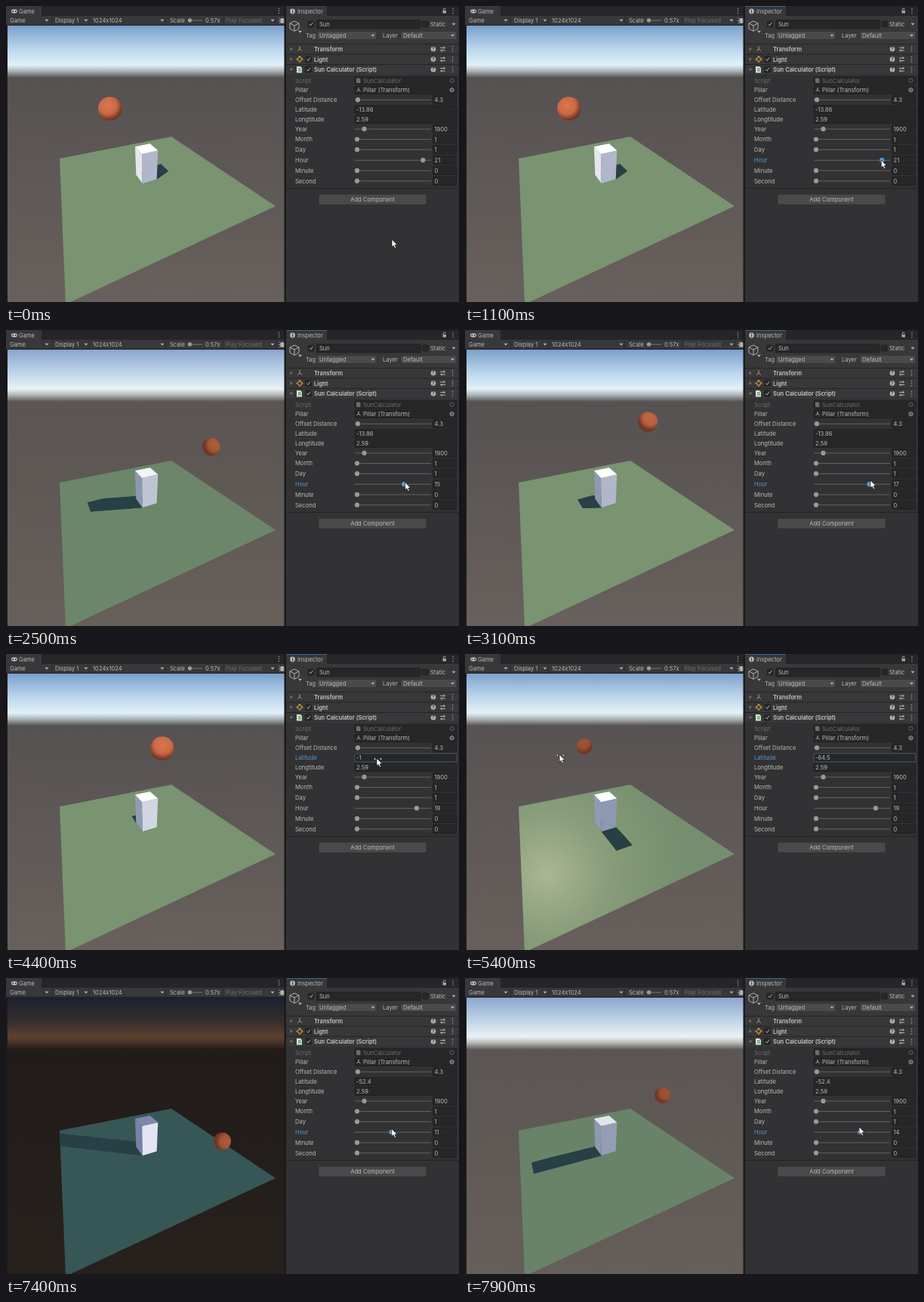
Recreate the animation shown at these times as an HTML page with a canvas. Size 600 px wide and 392 px high, loop 8 s.

```html
<!DOCTYPE html>
<html lang="en">
<head>
<meta charset="utf-8">
<title>Sun Calculator</title>
<style>
  html, body { margin: 0; width: 100%; height: 100%; overflow: hidden; background: #1b1b1b; }
  canvas, svg { position: absolute; left: 0; top: 0; width: 600px; height: 392px; display: block; }
  text { font: 7.6px Inter, "Liberation Sans", sans-serif; fill: #bababa; white-space: pre; }
  .bold { font-weight: 600; fill: #c8c8c8; }
  .dim { fill: #6e6e6e; }
  .focus { fill: #5a97cc; }
  .field { fill: #272628; stroke: #1f1f1f; stroke-width: .7; }
  .drop { fill: #4a494b; stroke: #303030; stroke-width: .7; }
  .icon { fill: none; stroke: #b0b0b0; stroke-width: 1; }
  .solid { fill: #b0b0b0; }
</style>
</head>
<body>
<canvas id="scene" width="600" height="392"></canvas>
<svg id="ui" viewBox="0 0 600 392"></svg>
<script>
const LOOP = 8000;
const ui = document.getElementById('ui');
const ctx = document.getElementById('scene').getContext('2d');

/* ---------- editor panels ---------- */
const PANEL = '#323133', BAR = '#383739', TABS = '#262527';
const rect = (x, y, w, h, fill) => `<rect x="${x}" y="${y}" width="${w}" height="${h}" fill="${fill}"/>`;
const box = (x, y, w, h, cls = 'field', id = '') =>
  `<rect id="${id}" class="${cls}" x="${x}" y="${y}" width="${w}" height="${h}" rx="1.5"/>`;
const text = (x, y, s, cls = '', id = '') => `<text id="${id}" class="${cls}" x="${x}" y="${y}">${s}</text>`;
const path = (d, cls = 'icon') => `<path class="${cls}" d="${d}"/>`;
const dot = (x, y, r, id = '') => `<circle id="${id}" cx="${x}" cy="${y}" r="${r}" fill="#999"/>`;
const arrow = (x, y) => path(`M${x - 2.5} ${y - 1.2}h5l-2.5 3z`, 'solid');
const more = (x, y) => [-3, 0, 3].map(d => dot(x, y + d, .8)).join('');
const check = (x, y, on) => box(x - 4, y - 4, 8, 8) + (on ? path(`M${x - 2.3} ${y}l1.8 2 3-4.3`) : '');
const fold = (x, y, open) =>
  `<path fill="#6c6c6c" d="${open ? `M${x - 2.5} ${y - 1.5}h5l-2.5 3.5z` : `M${x - 1.5} ${y - 2.5}v5l3.5-2.5z`}"/>`;

function gamePanel() {
  return rect(0, 0, 370, 13, TABS) + rect(0, 0, 47, 13, BAR) +
    rect(0, 13, 370, 13, BAR) + rect(0, 25, 370, 1, '#202020') +
    '<rect x="7" y="4.5" width="8" height="5" rx="2.4" fill="#c4c4c4"/>' +
    '<circle cx="9.3" cy="7" r="1" fill="#333"/><circle cx="12.8" cy="7" r="1" fill="#333"/>' +
    text(17, 10, 'Game') + more(361.5, 6.5) +
    text(5, 22, 'Game') + arrow(54, 19) + text(65, 22, 'Display 1') + arrow(106, 19) +
    text(115, 22, '1024x1024') + arrow(207, 19) + text(217, 22, 'Scale') +
    rect(241, 18.6, 19, 1, '#777') + dot(243.5, 19, 2.7) + text(264, 22, '0.57x') +
    text(291, 22, 'Play Focused', 'dim') + arrow(353, 19) +
    [60, 110, 211, 287, 357].map(x => rect(x, 14, .8, 11, '#2a2a2a')).join('') +
    '<ellipse cx="366" cy="19.5" rx="2.6" ry="3.6" fill="#b5b5b5"/>' +
    path('M362 16l8 7M362 23l8-7M361.5 19.5h9').replace('class', 'stroke-width=".6" class') +
    rect(368.5, 0, 2.5, 392, '#1b1b1b');
}

function header(y, name, open) {
  return rect(371, y, 229, 13.6, BAR) + rect(371, y, 229, .8, '#222') + fold(378, y + 7, open) +
    text(408, y + 10, name, 'bold') + `<circle cx="566" cy="${y + 7}" r="3.3" fill="#b4b4b4"/>` +
    `<text x="564.3" y="${y + 9.2}" style="font-size:6px;font-weight:700;fill:#333">?</text>` +
    path(`M575 ${y + 5.3}h7M575 ${y + 8.9}h7M580 ${y + 3.5}v3.4M577 ${y + 7.2}v3.4`) + more(591.5, y + 7);
}

function slider(y, name, at, value, id = '') {
  return text(383, y, name, '', id + 'Label') + rect(462, y - 3.2, 101, 1, '#646464') +
    dot(at, y - 2.8, 3.1, id + 'Knob') + box(565.5, y - 8.6, 31, 11.4) + text(567.5, y + .2, value, '', id + 'Text');
}

function inspector() {
  let s = rect(371, 0, 229, 392, PANEL) + rect(371, 0, 229, 13, TABS) + rect(371, 0, 54, 13, BAR) +
    '<rect id="tabLine" x="371" y="0" width="54" height="1" fill="#34628f"/>' +
    '<circle cx="379.5" cy="7" r="3.4" fill="#b8b8b8"/>' + rect(379, 6.2, 1.1, 3, '#333') + rect(379, 4.5, 1.1, 1, '#333') +
    text(386, 10, 'Inspector') + rect(578.5, 6, 4.5, 3.6, '#a5a5a5') + path('M579.3 6v-1.3a1.5 1.5 0 0 1 3 0') + more(592, 6.5) +
    rect(371, 13, 229, 37, BAR) +
    path('M376 23l6-3 6 3v7l-6 3.3-6-3.3zM376 23l6 3 6-3M382 26v7.3') + arrow(389.5, 34) +
    check(404, 24, true) + box(411.5, 18.6, 138, 11.4) + text(415, 27, 'Sun') +
    check(555.5, 24, false) + text(562, 27, 'Static') + arrow(593, 24) +
    text(397, 41.8, 'Tag') + box(412, 33.5, 79, 11, 'drop') + text(415, 41.8, 'Untagged') + arrow(486, 39) +
    text(499, 41.8, 'Layer') + box(523, 33.5, 74, 11, 'drop') + text(526, 41.8, 'Default') + arrow(591.5, 39) +
    header(50, 'Transform') + header(63.6, 'Light') + header(77.2, 'Sun Calculator (Script)', true) +
    '<path d="M389 57v-4M389 57l-3 2.5M389 57l3 2.5" fill="none" stroke="#b99a6a"/>' +
    '<path d="M389 67l3.5 3.5-3.5 3.5-3.5-3.5z" fill="none" stroke="#d9a33c" stroke-width="1.8" stroke-dasharray="1.5 .8"/>' +
    check(400.5, 70.5, true) + check(400.5, 84, true) +
    '<path d="M385 80h5l2 2v6.5h-7z" fill="#d5e0d5"/><path d="M387 83h3.6M387 85.5h3.6M388 82v5M390 82v5" stroke="#3f9a54" stroke-width=".7"/>' +
    text(383, 101.5, 'Script', 'dim') + box(462, 93.5, 135, 10.6) + text(473, 101.5, 'SunCalculator', 'dim') +
    '<path d="M464 95.5h4l1.5 1.5v5h-5.5z" fill="#667066"/><circle cx="590.5" cy="98.7" r="2.5" fill="none" stroke="#666"/>' +
    text(383, 114, 'Pillar') + box(462, 106, 135, 10.6) + text(473, 114, 'Pillar (Transform)') +
    path('M467 111v-3M467 111l-2.5 2M467 111l2.5 2') + '<circle class="icon" cx="590.5" cy="111.2" r="2.5"/>' + dot(590.5, 111.2, 1) +
    slider(127, 'Offset Distance', 466, '4.3') +
    text(383, 140, 'Latitude', '', 'latLabel') + box(462, 131.8, 135, 11, 'field', 'latField') + text(464, 140, '', '', 'latText') +
    text(383, 152.7, 'Longtitude') + box(462, 144.7, 135, 10.8) + text(464, 152.7, '2.59');
  s += slider(165.7, 'Year', 474.5, '1900') + slider(179.3, 'Month', 465, '1') + slider(193, 'Day', 465, '1') +
    slider(207, 'Hour', 553, '', 'hour') + slider(220.7, 'Minute', 465, '0') + slider(234.5, 'Second', 465, '0');
  return s + rect(371, 241, 229, 1, '#222') + box(414, 249.3, 143, 13.7, 'drop') +
    '<text x="485.5" y="259" text-anchor="middle">Add Component</text>';
}

ui.innerHTML = gamePanel() + inspector() +
  '<g id="cursor"><path id="scrub" d="M-1.5 -1l-2.5 2 2.5 2zM4.5 -1l2.5 2-2.5 2z" fill="#eee" stroke="#222" stroke-width=".5"/>' +
  '<path d="M0 0v10.2l2.3-2 1.7 3.7 1.7-.8-1.6-3.5h3.2z" fill="#fff" stroke="#111" stroke-width=".7"/></g>';
const el = id => document.getElementById(id);

/* ---------- timeline ---------- */
const CURSOR = [[0, 511, 309], [400, 511, 309], [950, 554, 204], [1700, 528, 203], [2100, 524, 203],
  [3100, 537, 199], [3500, 545, 201], [3950, 417, 138], [4400, 491, 138], [5400, 125, 133],
  [5750, 195, 135], [6200, 545, 203], [6800, 496, 203], [7900, 522, 197], [8000, 523, 197]];

function cursorAt(t) {
  const i = CURSOR.findIndex(k => k[0] > t);
  const a = CURSOR[i - 1], b = CURSOR[i];
  const p = (t - a[0]) / (b[0] - a[0]), e = p * p * (3 - 2 * p);
  return [a[1] + (b[1] - a[1]) * e, a[2] + (b[2] - a[2]) * e];
}

function stateAt(t) {
  const [x, y] = cursorAt(t);
  const dragHour = Math.round((x - 464) / 4.22);
  const dragLat = Math.round((-13.86 + .1735 * (x - 417)) * 10) / 10;
  const scrub = t >= 3950 && t < 5750;
  return {
    x, y, scrub,
    hour: t < 950 ? 21 : t < 3500 || t >= 6200 ? dragHour : 19,
    lat: t < 3950 ? -13.86 : scrub ? dragLat : -52.4,
    focus: t < 950 ? '' : t < 3950 || t >= 6200 ? 'hour' : 'lat'
  };
}

function drawUi(s) {
  el('cursor').setAttribute('transform', `translate(${s.x} ${s.y})`);
  el('scrub').style.display = s.scrub ? '' : 'none';
  el('tabLine').style.display = s.focus ? '' : 'none';
  el('latText').textContent = s.lat;
  el('hourText').textContent = s.hour;
  el('hourKnob').setAttribute('cx', 464.5 + 4.18 * s.hour);
  el('hourKnob').style.fill = s.focus === 'hour' ? '#5b9bd5' : '';
  el('hourLabel').setAttribute('class', s.focus === 'hour' ? 'focus' : '');
  el('latLabel').setAttribute('class', s.focus === 'lat' ? 'focus' : '');
  el('latField').style.stroke = s.focus === 'lat' ? '#4a6c80' : '';
}

/* ---------- 3D scene: right, depth, up; the camera is one unit above ground ---------- */
const UNIT = .148, HEIGHT = 2.07 * UNIT, FOCAL = 231, COS = .845, SIN = .534;
const EAST = [.901, .434], NORTH = [-.434, .901], CENTER = [.002, 1.345];
const ORBIT = .655, RADIUS = .074;
const LAWN = [[71, 202], [219, 173], [357, 265], [79, 395]];

const view = (r, n, u) => [r, -u * COS - n * SIN, n * COS - u * SIN];
function project(r, n, u) {
  const [x, y, z] = view(r, n, u);
  return [185.5 + FOCAL * x / z, 209 + FOCAL * y / z, z];
}
const compass = (e, n) => [0, 1].map(i => e * EAST[i] + n * NORTH[i]);
const place = (e, n, u) => [...compass(e, n).map((v, i) => v + CENTER[i]), u - 1];
const square = (half, u, de = 0, dn = 0) =>
  [[-1, -1], [1, -1], [1, 1], [-1, 1]].map(([e, n]) => project(...place(e * half + de, n * half + dn, u)));

function sunDirection(hour, lat) {
  const rad = Math.PI / 180, h = ((hour - 19) * 15 + 1) * rad, f = lat * rad, d = -23 * rad;
  return {
    e: -Math.cos(d) * Math.sin(h),
    n: Math.sin(d) * Math.cos(f) - Math.cos(d) * Math.sin(f) * Math.cos(h),
    u: Math.sin(f) * Math.sin(d) + Math.cos(f) * Math.cos(d) * Math.cos(h)
  };
}

const mix = (a, b, p) => a.map((v, i) => v + (b[i] - v) * p);
const rgb = c => `rgb(${c.map(v => Math.round(Math.min(255, Math.max(0, v)))).join()})`;
function ramp(stops, v) {
  if (v <= stops[0][0]) return stops[0][1];
  for (let i = 1; i < stops.length; i++) {
    const [a, from] = stops[i - 1], [b, to] = stops[i];
    if (v < b) return mix(from, to, (v - a) / (b - a));
  }
  return stops[stops.length - 1][1];
}

// Each entry: stage height, then its colour at dusk, low sun and high sun
const SKY = [
  [26, [28, 34, 48], [142, 168, 206], [122, 160, 204]],
  [56, [52, 46, 46], [192, 212, 232], [184, 212, 236]],
  [78, [96, 66, 46], [236, 242, 246], [226, 241, 249]],
  [86, [70, 50, 40], [182, 182, 180], [172, 181, 186]],
  [95, [34, 28, 26], [92, 86, 84], [86, 82, 82]],
  [392, [40, 34, 31], [102, 94, 89], [104, 96, 92]]];
const GRASS = [[-.1, [48, 82, 83]], [.05, [56, 88, 86]], [.45, [103, 130, 104]], [.87, [122, 147, 113]]];
const STONE = [[-.1, [110, 122, 162]], [.4, [143, 152, 177]]];
const BALL_DARK = [112, 54, 36];

function fill(points, color) {
  ctx.beginPath();
  points.forEach(p => ctx.lineTo(p[0], p[1]));
  ctx.closePath();
  ctx.fillStyle = color;
  ctx.fill();
}

function drawSky(up) {
  const g = ctx.createLinearGradient(0, 26, 0, 392);
  for (const [y, dusk, low, high] of SKY)
    g.addColorStop((y - 26) / 366, rgb(ramp([[-.1, [0, 0, 0]], [.04, dusk], [.42, low], [.87, high]], up)));
  ctx.fillStyle = g;
  ctx.fillRect(2, 26, 367, 366);
}

function drawGround(sun) {
  fill(LAWN, rgb(ramp(GRASS, sun.u)));
  if (sun.u <= 0) return;

  ctx.save();
  ctx.clip();
  // The glare sits where the mirrored sun would be seen
  const [gx, gy, gz] = project(...compass(sun.e, sun.n), -sun.u);
  if (gz > .3) {
    const g = ctx.createRadialGradient(gx, gy, 0, gx, gy, 190);
    g.addColorStop(0, 'rgba(204,206,172,.62)');
    g.addColorStop(.45, 'rgba(190,198,155,.26)');
    g.addColorStop(1, 'rgba(165,185,135,0)');
    ctx.fillStyle = g;
    ctx.fillRect(2, 26, 367, 366);
  }
  const reach = Math.min(HEIGHT / sun.u, 1.2 / Math.hypot(sun.e, sun.n));
  const base = square(UNIT / 2, 0), tip = square(UNIT / 2, 0, -sun.e * reach, -sun.n * reach);
  const dark = rgb([38, 64, 70]);
  fill(tip, dark);
  base.forEach((p, i) => {
    const j = (i + 1) % 4;
    fill([p, base[j], tip[j], tip[i]], dark);
  });
  ctx.restore();
}

function drawPillar(sun) {
  const low = square(UNIT / 2, 0), top = square(UNIT / 2, HEIGHT);
  const lit = [180, 165, 130];
  const shade = k => rgb(ramp(STONE, sun.u).map((v, i) => v + Math.max(0, k) * lit[i]));
  fill([low[3], low[0], top[0], top[3]], shade(-sun.e));
  fill([low[0], low[1], top[1], top[0]], shade(-sun.n));
  fill(top, shade(sun.u));
}

function drawBall(sun, ball, cut) {
  const [x, y, z] = project(...ball), r = FOCAL * RADIUS / z;
  const lift = ball[2] + 1;
  ctx.save();
  if (cut && lift < RADIUS) {
    const w = Math.sqrt(RADIUS * RADIUS - lift * lift) * FOCAL / z;
    const cy = project(ball[0], ball[1], -1)[1], side = lift > 0 ? r : w;
    ctx.beginPath();
    ctx.rect(x - side, cy - 2 * r, 2 * side, 2 * r);
    ctx.ellipse(x, cy, w, w * .68, 0, 0, Math.PI * 2);
    ctx.clip();
  }
  const [lx, ly, lz] = view(...compass(sun.e, sun.n), sun.u);
  const bright = mix([162, 84, 50], [222, 118, 78], Math.min(1, Math.max(0, -lz / .75)));
  const hx = x + lx * r * .55, hy = y + ly * r * .55;
  const g = ctx.createRadialGradient(hx, hy, 0, hx, hy, r * 1.5);
  g.addColorStop(0, rgb(bright));
  g.addColorStop(.5, rgb(mix(bright, BALL_DARK, .2)));
  g.addColorStop(.82, rgb(BALL_DARK));
  ctx.fillStyle = g;
  ctx.beginPath();
  ctx.arc(x, y, r, 0, Math.PI * 2);
  ctx.fill();
  ctx.restore();
}

function drawScene(s) {
  const sun = sunDirection(s.hour, s.lat);
  const ball = place(sun.e * ORBIT, sun.n * ORBIT, UNIT + sun.u * ORBIT);
  const visible = ball[2] + 1 > -RADIUS, behind = project(...ball)[2] > 1.59;
  ctx.save();
  ctx.beginPath();
  ctx.rect(2, 26, 367, 366);
  ctx.clip();
  drawSky(sun.u);
  if (ball[2] < -1) drawBall(sun, ball, false);
  drawGround(sun);
  if (visible && behind) drawBall(sun, ball, true);
  drawPillar(sun);
  if (visible && !behind) drawBall(sun, ball, true);
  ctx.restore();
}

const start = performance.now();
function tick() {
  const s = stateAt((performance.now() - start) % LOOP);
  drawScene(s);
  drawUi(s);
  requestAnimationFrame(tick);
}
tick();
</script>
</body>
</html>
```
